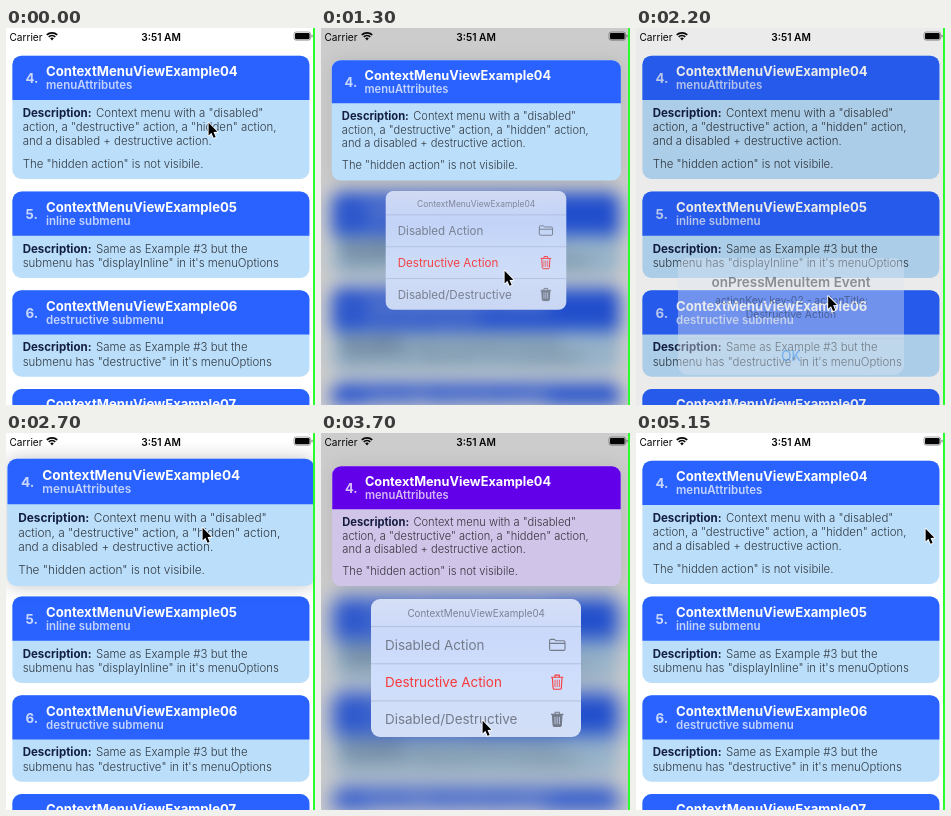
Recreate the animation shown at these times as an HTML page with a canvas. Size 309 px wide and 377 px high, loop 5.31 s.

```html
<!DOCTYPE html>
<html lang="en">
<head>
<meta charset="utf-8">
<title>Context menu demo</title>
<style>
  html, body { margin: 0; width: 100%; height: 100%; overflow: hidden; background: #fff; }
  canvas { display: block; width: 309px; height: 377px; }
</style>
</head>
<body>
<canvas id="stage"></canvas>
<script>
const W = 309, H = 377, LOOP = 5310;
const FAMILY = 'Inter, Roboto, sans-serif';
const ratio = window.devicePixelRatio || 1;

function prepare(canvas) {
  canvas.width = Math.round(W * ratio);
  canvas.height = Math.round(H * ratio);
  const context = canvas.getContext('2d');
  context.setTransform(ratio, 0, 0, ratio, 0, 0);
  return context;
}

const ctx = prepare(document.getElementById('stage'));
const layer = document.createElement('canvas');
const back = prepare(layer);

const BLUE = { head: '#2962ff', body: '#bbdefb' };
const PURPLE = { head: '#6200ea', body: '#d1c4e9' };
const LEFT = 6.4, WIDTH = 297;

const CARDS = [
  { y: 27.7, h: 123.3, num: 4, sub: 'menuAttributes', lines: [
    [61.3, 'Context menu with a "disabled"'],
    [75.4, 'action, a "destructive" action, a "hidden" action,'],
    [89.6, 'and a disabled + destructive action.'],
    [111.8, 'The "hidden action" is not visibile.']] },
  { y: 163.5, h: 86.5, num: 5, sub: 'inline submenu', lines: [
    [61, 'Same as Example #3 but the'],
    [75.5, 'submenu has "displayInline" in it\'s menuOptions']] },
  { y: 262.2, h: 86.5, num: 6, sub: 'destructive submenu', lines: [
    [61, 'Same as Example #3 but the'],
    [75.5, 'submenu has "destructive" in it\'s menuOptions']] },
  { y: 361, h: 86.5, num: 7, sub: 'destructive submenu', lines: [] }
];

// Each key is [time, value, value, ...]; values ease between keys.
function track(keys, t, ease = x => x) {
  if (t <= keys[0][0]) return keys[0].slice(1);
  for (let i = 1; i < keys.length; i++) {
    const a = keys[i - 1], b = keys[i];
    if (t < b[0]) {
      const p = ease((t - a[0]) / (b[0] - a[0]));
      return a.slice(1).map((v, n) => v + (b[n + 1] - v) * p);
    }
  }
  return keys[keys.length - 1].slice(1);
}
const smooth = x => x * x * (3 - 2 * x);

const CURSOR = [
  [0, 202, 94], [700, 202, 94], [1100, 183, 242], [1400, 183, 242],
  [1800, 190, 328], [2100, 190, 328], [2400, 196, 94], [3100, 196, 94],
  [3600, 161, 287], [3900, 161, 287], [4400, 289, 95]
];

// Columns: card scale, card shift, shadow, blur, dim, menu scale, menu alpha
const OPENING = [
  [0, 1, 0, 0, 0, 0, .2, 0],
  [300, 1.033, 0, .24, 0, 0, .2, 0],
  [400, 1.02, .4, .26, 1.1, .01, .4, .08],
  [500, .99, 2.2, .2, 5, .1, .78, .6],
  [600, .974, 3.3, .13, 9, .18, .96, .95],
  [700, .971, 3.8, .1, 10, .2, 1, 1]
];
const CLOSING = [
  [0, .971, 3.8, .1, 10, .2, 1, 1],
  [100, .973, 2.9, .1, 8.5, .2, .86, .95],
  [200, .986, 1.4, .08, 4, .15, .5, .45],
  [300, .996, .4, .04, 1, .07, .2, 0],
  [400, 1, 0, 0, 0, 0, .2, 0]
];
const SESSIONS = [{ start: 0, close: 1200 }, { start: 2400, close: 4500 }];

const ALERT = [
  [1400, 0, 1.18], [1500, .25, 1.13], [1600, .75, 1.04], [1700, 1, 1],
  [2050, 1, 1], [2300, 0, 1]
];

function box(c, x, y, w, h, r, fill) {
  c.beginPath();
  c.roundRect(x, y, w, h, r);
  if (fill) {
    c.fillStyle = fill;
    c.fill();
  }
}

function text(c, str, x, y, size, weight, color, align = 'left') {
  c.font = `${weight} ${size}px ${FAMILY}`;
  c.textAlign = align;
  c.fillStyle = color;
  c.fillText(str, x, y);
}

function rule(c, x1, x2, y, color) {
  c.fillStyle = color;
  c.fillRect(x1, y, x2 - x1, .7);
}

function drawCard(c, card, skin) {
  const y = card.y;
  box(c, LEFT, y, WIDTH, card.h, 9, skin.body);
  box(c, LEFT, y, WIDTH, 44.2, [9, 9, 0, 0], skin.head);
  text(c, card.num + '.', 19.5, y + 27.3, 13.3, 700, 'rgba(255,255,255,.75)');
  text(c, 'ContextMenuViewExample0' + card.num, 40, y + 20.4, 13.12, 700, '#fff');
  text(c, card.sub, 40, y + 33.7, 11.5, 600, 'rgba(255,255,255,.72)');
  card.lines.forEach(([dy, str], i) => {
    if (i === 0) text(c, 'Description:', 16.7, y + dy, 11.5, 700, 'rgba(0,10,45,.9)');
    text(c, str, i === 0 ? 90 : 16.7, y + dy, 11.45, 300, 'rgba(0,0,0,.75)');
  });
}

function scaleAbout(x, y, s) {
  ctx.translate(x, y);
  ctx.scale(s, s);
  ctx.translate(-x, -y);
}

function shade(alpha) {
  if (alpha <= 0) return;
  ctx.fillStyle = `rgba(0,0,0,${alpha})`;
  ctx.fillRect(0, 0, W, H);
}

// The list recedes a little as it blurs.
function drawBackdrop(hideFirst, blur, dim) {
  back.fillStyle = '#fff';
  back.fillRect(0, 0, W, H);
  back.save();
  const s = 1 - blur * .0035;
  back.translate(W / 2 * (1 - s), H / 2 * (1 - s));
  back.scale(s, s);
  CARDS.forEach((card, i) => {
    if (i > 0 || !hideFirst) drawCard(back, card, BLUE);
  });
  back.restore();
  ctx.fillStyle = '#fff';
  ctx.fillRect(0, 0, W, H);
  ctx.save();
  if (blur > 0) ctx.filter = `blur(${blur * ratio}px)`;
  ctx.drawImage(layer, 0, 0, W, H);
  ctx.restore();
  shade(dim);
}

function drawLifted(scale, shift, shadow, skin) {
  const card = CARDS[0];
  ctx.save();
  ctx.translate(shift * .15, shift);
  scaleAbout(155, 89.5, scale);
  ctx.save();
  ctx.shadowColor = `rgba(0,0,0,${shadow})`;
  ctx.shadowBlur = 18 * ratio;
  box(ctx, LEFT, card.y, WIDTH, card.h, 9, skin.body);
  ctx.restore();
  drawCard(ctx, card, skin);
  ctx.restore();
}

function folder(y, color) {
  ctx.strokeStyle = color;
  ctx.lineWidth = 1.1;
  ctx.beginPath();
  ctx.moveTo(228.6, y + 4);
  ctx.lineTo(228.6, y - 4.2);
  ctx.quadraticCurveTo(228.6, y - 5.6, 230, y - 5.6);
  ctx.lineTo(233, y - 5.6);
  ctx.lineTo(235, y - 4.2);
  ctx.lineTo(242.4, y - 4.2);
  ctx.quadraticCurveTo(244, y - 4.2, 244, y - 2.8);
  ctx.lineTo(244, y + 4);
  ctx.quadraticCurveTo(244, y + 5.4, 242.6, y + 5.4);
  ctx.lineTo(230, y + 5.4);
  ctx.quadraticCurveTo(228.6, y + 5.4, 228.6, y + 4);
  ctx.moveTo(228.6, y - 1.6);
  ctx.lineTo(244, y - 1.6);
  ctx.stroke();
}

function trash(y, color, solid) {
  ctx.strokeStyle = ctx.fillStyle = color;
  ctx.lineWidth = 1.1;
  ctx.beginPath();
  ctx.moveTo(230, y - 4.8);
  ctx.lineTo(242.4, y - 4.8);
  ctx.moveTo(233.8, y - 4.8);
  ctx.lineTo(234.2, y - 7);
  ctx.lineTo(238.2, y - 7);
  ctx.lineTo(238.6, y - 4.8);
  ctx.stroke();
  ctx.beginPath();
  ctx.moveTo(231.4, y - 4.4);
  ctx.lineTo(232.1, y + 6);
  ctx.quadraticCurveTo(232.2, y + 7.2, 233.4, y + 7.2);
  ctx.lineTo(239, y + 7.2);
  ctx.quadraticCurveTo(240.2, y + 7.2, 240.3, y + 6);
  ctx.lineTo(241, y - 4.4);
  if (solid) ctx.fill();
  ctx.stroke();
  ctx.strokeStyle = solid ? '#cad8f4' : color;
  ctx.lineWidth = .8;
  ctx.beginPath();
  for (const x of [234, 236.2, 238.4]) {
    ctx.moveTo(x, y - 2.4);
    ctx.lineTo(x, y + 5);
  }
  ctx.stroke();
}

function drawMenu(scale, alpha) {
  if (alpha <= 0) return;
  ctx.save();
  ctx.globalAlpha = alpha;
  scaleAbout(155, 145, scale);
  const fill = ctx.createLinearGradient(0, 166, 0, 304);
  fill.addColorStop(0, '#d6def5');
  fill.addColorStop(.25, '#cad9fa');
  fill.addColorStop(.6, '#cfdefb');
  fill.addColorStop(1, '#d2def6');
  box(ctx, 50, 166, 210, 138, 9, fill);
  text(ctx, 'ContextMenuViewExample04', 155.2, 184, 9.85, 400, '#7b8296', 'center');
  const gray = '#747b8a', red = '#f8383a';
  const rows = [['Disabled Action', gray], ['Destructive Action', red], ['Disabled/Destructive', gray]];
  rows.forEach(([label, color], i) => {
    const mid = 212 + i * 37.1;
    rule(ctx, 50, 260, mid - 18.6, 'rgba(90,105,140,.36)');
    text(ctx, label, 64, mid + 4.8, 13.45, 400, color);
    if (i === 0) folder(mid, color);
    else trash(mid, color, i === 2);
  });
  ctx.restore();
}

function drawAlert(alpha, scale) {
  if (alpha <= 0) return;
  shade(.2 * alpha);
  ctx.save();
  ctx.globalAlpha = alpha;
  scaleAbout(155, 288.5, scale);
  const fill = ctx.createLinearGradient(0, 230, 0, 347);
  fill.addColorStop(0, '#d8e4f4');
  fill.addColorStop(.5, '#e0e7f0');
  fill.addColorStop(1, '#d9e6f4');
  box(ctx, 42, 230, 226, 117, 10, fill);
  text(ctx, 'onPressMenuItem Event', 155, 259, 13.5, 600, '#05080c', 'center');
  text(ctx, 'actionKey: key-02 - actionTitle:', 155.5, 276, 10.4, 400, '#10151b', 'center');
  text(ctx, 'Destructive Action', 155, 289.8, 10.4, 400, '#10151b', 'center');
  rule(ctx, 42, 268, 310, 'rgba(80,100,130,.22)');
  text(ctx, 'OK', 155, 333.4, 13.8, 500, '#1680f5', 'center');
  ctx.restore();
}

function drawStatus() {
  const ink = '#050505';
  text(ctx, 'Carrier', 3.5, 12.7, 10.1, 400, ink);
  text(ctx, '3:51 AM', 155, 12.7, 10.2, 600, ink, 'center');
  ctx.strokeStyle = ctx.fillStyle = ink;
  ctx.lineWidth = 1.7;
  for (const r of [4.6, 7.4]) {
    ctx.beginPath();
    ctx.arc(46, 12.2, r, Math.PI * 1.25, Math.PI * 1.75);
    ctx.stroke();
  }
  ctx.beginPath();
  ctx.moveTo(46, 12.6);
  ctx.arc(46, 12.2, 2.6, Math.PI * 1.25, Math.PI * 1.75);
  ctx.fill();
  ctx.lineWidth = .7;
  box(ctx, 288, 4, 16.6, 8.2, 2.2);
  ctx.strokeStyle = 'rgba(0,0,0,.5)';
  ctx.stroke();
  box(ctx, 289, 5, 14.6, 6.2, 1.3, ink);
  box(ctx, 305.5, 6.8, 1, 2.6, .5, 'rgba(0,0,0,.5)');
}

function drawCursor(x, y) {
  const shape = [[0, 0], [0, 14.4], [3.2, 11.4], [5.6, 17], [8, 16], [5.6, 10.5], [10, 10.2]];
  ctx.save();
  ctx.translate(x + .6, y + .8);
  ctx.scale(.88, .88);
  ctx.beginPath();
  shape.forEach(p => ctx.lineTo(...p));
  ctx.closePath();
  ctx.lineJoin = 'round';
  ctx.lineWidth = 2;
  ctx.strokeStyle = '#fff';
  ctx.stroke();
  ctx.fillStyle = '#000';
  ctx.fill();
  ctx.restore();
}

function render(t) {
  const session = SESSIONS[t < 2400 ? 0 : 1];
  const closing = t >= session.close;
  const [scale, shift, shadow, blur, dim, menuScale, menuAlpha] = closing
    ? track(CLOSING, t - session.close)
    : track(OPENING, t - session.start);
  const purple = t >= session.start + 400 && t < session.close + 100;
  const lifted = shadow > 0;

  drawBackdrop(lifted, blur, dim);
  if (lifted) drawLifted(scale, shift, shadow, purple ? PURPLE : BLUE);
  drawMenu(menuScale, menuAlpha);
  drawAlert(...track(ALERT, t));
  drawStatus();
  ctx.fillStyle = '#2bff2b';
  ctx.fillRect(307, 0, 2, H);
  drawCursor(...track(CURSOR, t, smooth));
}

function recorded(t) {
  if (t >= 5150) return 5150;
  return Math.min(5000, Math.floor(t / 100) * 100);
}

const begin = performance.now();
function tick() {
  render(recorded((performance.now() - begin) % LOOP));
  requestAnimationFrame(tick);
}
tick();
</script>
</body>
</html>
```
